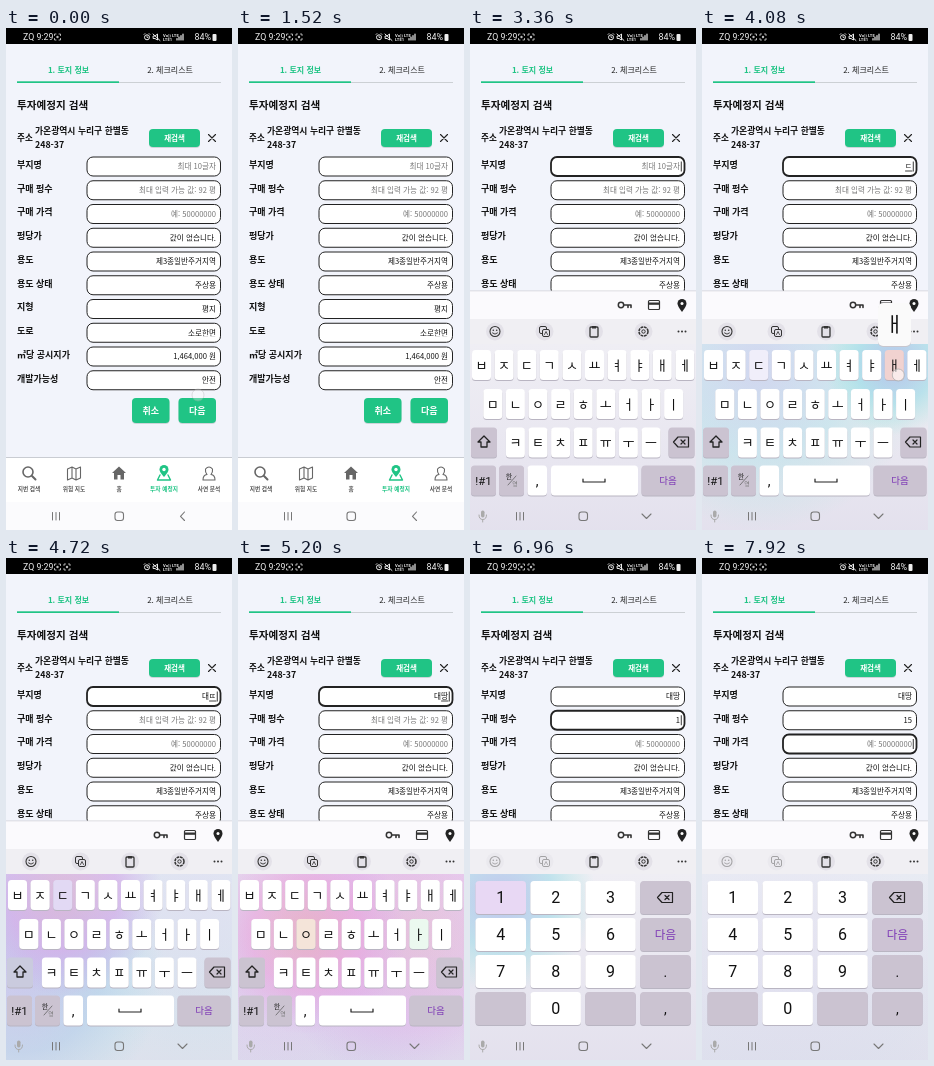
These frames come from a looping animation (226x502 px, 8000 ms). An HTML page:

```html
<!DOCTYPE html>
<html lang="ko">
<head>
<meta charset="utf-8">
<style>
html, body { margin: 0; height: 100%; overflow: hidden; background: #f2f4fb; }
svg { display: block; width: 100%; height: 100%; font-family: "Noto Sans CJK KR", "Noto Sans CJK", sans-serif; }
.latin { font-family: Roboto, "Noto Sans CJK KR", sans-serif; }
.line { fill: none; stroke: currentColor; stroke-linecap: round; stroke-linejoin: round; }
</style>
</head>
<body>
<svg id="stage" viewBox="0 0 226 502"></svg>
<script>
const LOOP = 8000, HOLD = 160;
const GREEN = '#20c485', FN = '#cbc3d1', PURPLE = '#7b35b5';
const clamp = v => Math.max(0, Math.min(1, v));

// --- markup helpers
const box = (x, y, w, h, fill, more = '') =>
  `<rect x="${x}" y="${y}" width="${w}" height="${h}" fill="${fill}" ${more}/>`;
const text = (x, y, size, s, fill = '#111', anchor = 'start', more = '') =>
  `<text x="${x}" y="${y}" font-size="${size}" fill="${fill}" text-anchor="${anchor}" ${more}>${s}</text>`;
const bold = 'font-weight="700"';
const line = (d, color = '#222', width = 1, more = '') =>
  `<path class="line" d="${d}" style="color:${color}" stroke-width="${width}" ${more}/>`;
const dot = (x, y, r, fill, more = '') => `<circle cx="${x}" cy="${y}" r="${r}" fill="${fill}" ${more}/>`;
const group = (id, body, more = '') => `<g id="${id}" ${more}>${body}</g>`;
const at = (x, y, body) => `<g transform="translate(${x} ${y})">${body}</g>`;

// --- status bar
const scan = line('M-3-1.5V-3H-1.5M1.5-3H3V-1.5M3 1.5V3H1.5M-1.5 3H-3V1.5', '#ddd', .8) + dot(0, 0, 1.2, '#bbb');
const status = box(0, 0, 226, 16, '#000') +
  text(17, 12.3, 8.8, 'ZQ 9:29', '#eee', 'start', 'class="latin"') +
  at(51.5, 9, scan) + group('scan2', at(61, 9, scan)) +
  dot(141, 9.3, 2.5, 'none', 'stroke="#eee"') + line('M138 6.5L139 5.5M144 6.5L143 5.5M141 8V9.5H142', '#eee', .8) +
  line('M147.5 8H149L151.500 6V12L149 10.500H147.500ZM147 6L154 12.500', '#eee', 1) +
  text(157, 8.7, 4.2, 'Vo)) LTE', '#eee', 'start', 'class="latin" font-weight="700"') +
  text(157, 12.8, 4.2, 'LTE1', '#eee', 'start', 'class="latin" font-weight="700"') +
  line('M171 12V10.500M173 12V9M175 12V7.500M177 12V6', '#eee', 1.2) +
  text(188.500, 12.3, 9, '84%', '#eee', 'start', 'class="latin"') +
  box(206.500, 6, 4, 7, '#eee', 'rx="1"');

// --- form
const rows = [
  ['부지명', '최대 10글자', 1], ['구매 평수', '최대 입력 가능 값: 92 평', 1], ['구매 가격', '예: 50000000', 1],
  ['평당가', '값이 없습니다.'], ['용도', '제3종일반주거지역'], ['용도 상태', '주상용'], ['지형', '평지'],
  ['도로', '소로한면'], ['㎡당 공시지가', '1,464,000 원'], ['개발가능성', '안전']
];
const rowY = i => 138.5 + i * 23.75;
const row = ([label, value, empty], i) => {
  const y = rowY(i);
  return text(11, y + 1.3, 9, label, '#111', 'start', bold) +
    box(81, y - 9.5, 133.5, 19, '#fff', `id="box${i}" rx="6" stroke="#222"`) +
    text(210, y + 2.8, 7.6, value, empty ? '#777' : '#111', 'end', `id="val${i}"`) +
    box(88, y + 3.500, 122.500, 2.500, '#fff');
};
const button = (x, y, w, h, size, s) =>
  box(x, y + 1, w, h, '#aab5b8', 'rx="4" opacity=".5"') + box(x, y, w, h, GREEN, 'rx="4"') +
  text(x + w / 2, y + h / 2 + size * .36, size, s, '#fff', 'middle', bold);

const form = box(0, 16, 226, 486, '#f2f4fb') +
  text(62.5, 44.5, 8, '1. 토지 정보', GREEN, 'middle', bold) +
  text(164, 44.5, 8, '2. 체크리스트', '#222', 'middle') +
  box(11, 54, 204, 1, '#ccd0d4') + box(11, 53.3, 102, 1.7, GREEN) +
  text(11, 80.5, 10.6, '투자예정지 검색', '#111', 'start', bold) +
  text(11, 112.8, 8.6, '주소', '#111', 'start', bold) +
  text(29, 106, 8.8, '가온광역시 누리구 한별동', '#111', 'start', bold) +
  text(29, 120, 8.8, '248-37', '#111', 'start', bold) +
  button(143, 101, 51, 18, 7.5, '재검색') + line('M202.500 106.500L209.500 113.500M209.500 106.500L202.500 113.500', '#222', 1.1) +
  rows.map(row).join('') +
  line('', '#111', .8, 'id="under"') + box(210.8, 133, .9, 10, '#222', 'id="caret"') +
  button(126, 370, 37.5, 25, 9, '취소') + button(172.5, 370, 37.5, 25, 9, '다음');

// --- bottom tabs
const person = line('M-6 7Q-6 2-2 1.500Q-4-1-3.500-4Q0-8 3.500-4Q4-1 2 1.500Q6 2 6 7Z', '#666', 1.1);
const tabIcons = [
  line('M3 3L6.500 6.500', '#666', 2) + dot(-1, -1, 5, 'none', 'stroke="#666" stroke-width="1.6"'),
  line('M-6.500-4L-2-6L2-4L6.500-6V5L2 7L-2 5L-6.500 7ZM-2-6V5M2-4V7', '#666', 1.1),
  '<path d="M-7 0L0-6.500L7 0H5V6.500H1.500V2H-1.500V6.500H-5V0Z" fill="#666"/>',
  `<path d="M0 4Q-4.500-1-4.500-3.500A4.500 4.500 0 0 1 4.500-3.500Q4.500-1 0 4Z" fill="${GREEN}"/>` +
    dot(0, -3.500, 1.7, '#fff') + line('M-4 2L-6.500 7H6.500L4 2', GREEN, 1.4),
  person
];
const tabs = box(0, 429, 226, 45, '#fff') + box(0, 429, 226, 1, '#c9ccd2') +
  ['지번 검색', '위험 지도', '홈', '투자 예정지', '사연 분석'].map((s, i) =>
    at(23 + 45 * i, 445, tabIcons[i]) + text(23 + 45 * i, 462.5, 5.7, s, i == 3 ? GREEN : '#555', 'middle', bold)).join('') +
  box(0, 474, 226, 28, '#fbfbfd');

// --- suggestion bar above the keyboard
const bar = box(0, 263, 226, 50, '#fbfafd') + box(0, 262.500, 226, .8, '#d4d3da') +
  dot(151, 277, 2.700, 'none', 'stroke="#333" stroke-width="1.5"') + line('M154 277H161M158 277V279.500M161 277V279.500', '#333', 1.6) +
  box(178.500, 272.500, 11, 9, 'none', 'rx="1" stroke="#333" stroke-width="1.200"') + box(178.500, 274.500, 11, 2.300, '#333') +
  '<path d="M212 284Q207.500 278 207.500 275.500A4.500 4.500 0 0 1 216.500 275.500Q216.500 278 212 284Z" fill="#222"/>' + dot(212, 275.500, 1.5, '#fff');

// --- keyboard
const keys = {};
const key = (id, x, y, w, h, fn, size = 0, label = id, color = '#111') => {
  keys[id] = { x: x + w / 2, y: y + h / 2, base: fn ? FN : '#fff' };
  return box(x, y + 1, w, h, '#b9b5c2', 'rx="3.500"') +
    box(x, y, w, h, fn ? FN : '#fff', `rx="3.500" id="key-${id}"`) +
    (size ? text(x + w / 2, y + h / 2 + size * .36, size, label, color, 'middle', `id="cap-${id}" class="latin"`) : '');
};
const erase = (x, y) => at(x, y, line('M-8 0L-3.500-5H7V5H-3.500ZM-.500-2L3.500 2M3.500-2L-.500 2', '#222', 1.2));
const plain = 'ㅂㅈㄷㄱㅅㅛㅕㅑㅐㅔ', shifted = 'ㅃㅉㄸㄲㅆㅛㅕㅑㅒㅖ';
const letters = (s, x, y) => [...s].map((c, i) => key(c, x + i * 22.6, y, 19, 30, 0, 13)).join('');

const hangul = letters(plain, 2, 322) + letters('ㅁㄴㅇㄹㅎㅗㅓㅏㅣ', 13.3, 361) +
  key('shift', 1, 399.500, 26, 30, 1) + at(14, 414, line('M0-6L6 0H3V5H-3V0H-6Z', '#222', 1.3)) +
  letters('ㅋㅌㅊㅍㅠㅜㅡ', 35.9, 399.500) + key('del', 198.500, 399.500, 26, 30, 1) + erase(211.500, 414) +
  key('sym', 1, 437.500, 25, 30, 1, 11.5, '!#1') +
  key('lang', 29, 437.500, 25, 30, 1) + text(39, 451, 7, '한', '#222', 'middle') + text(45, 458, 6, '영', '#777', 'middle') + line('M38 457L46 448', '#555', .7) +
  key('comma', 57.500, 437.500, 19.500, 30, 0, 14, ',') +
  key('space', 81, 437.500, 87, 30, 0) + line('M113 451V454H135V451', '#222', 1.2) +
  key('next', 171.500, 437.500, 53, 30, 1, 9.5, '다음', PURPLE);

const padX = c => 5.500 + c * 54.9, padY = r => 323 + r * 37;
const padKey = (id, c, r, fn, ...cap) => key(id, padX(c), padY(r), 50.500, 33, fn, ...cap);
const pad = [...'123456789'].map((d, i) => padKey(d, i % 3, i / 3 | 0, 0, 16)).join('') +
  padKey('blank1', 0, 3, 1) + padKey('0', 1, 3, 0, 16) + padKey('blank2', 2, 3, 1) +
  padKey('del2', 3, 0, 1) + erase(195.500, 339.500) + padKey('next2', 3, 1, 1, 11.5, '다음', PURPLE) +
  padKey('dot', 3, 2, 1, 14, '.') + padKey('comma2', 3, 3, 1, 14, ',');

const tools = [
  dot(0, 0, 5, 'none', 'stroke="#333" stroke-width="1.100"') + dot(-1.700, -1.200, .8, '#333') + dot(1.700, -1.200, .8, '#333') + line('M-2.500 1.500Q0 4 2.500 1.500', '#333', .9),
  box(-5, -5, 7, 7, 'none', 'rx="1.500" stroke="#333"') + box(-2, -2, 7, 7, '#e3e1e8', 'rx="1.500" stroke="#333"') + line('M0 3L1.500 0L3 3', '#333', .8),
  box(-4, -4.500, 8, 10, 'none', 'rx="1" stroke="#333" stroke-width="1.300"') + box(-2, -5.500, 4, 2.500, '#333'),
  dot(0, 0, 4.500, 'none', 'stroke="#333" stroke-width="1.500" stroke-dasharray="2.800 .73"') + dot(0, 0, 1.700, 'none', 'stroke="#333"')
];
const toolbar = box(0, 291, 226, 25, '#f0eff3') +
  tools.map((s, i) => group('tool' + i, dot(0, 0, 9, '#e3e1e8') + s, `transform="translate(${25 + i * 49.500} 303.500)"`)).join('') +
  [208.500, 212, 215.500].map(x => dot(x, 303.500, 1, '#333')).join('');

// Each press: time, key, glow hue, key hue, field, resulting text
const presses = [
  [3600, 'ㄷ', 187, 250, 0, 'ㄷ'], [3980, 'ㅐ', 190, 5, 0, '대'], [4320, 'shift', 210, 220],
  [4500, 'ㄷ', 285, 260, 0, '대ㄸ'], [4760, 'ㅏ', 295, 140, 0, '대따'], [4980, 'ㅇ', 310, 25, 0, '대땅'],
  [5360, 'next', 270, 280], [6760, '1', 192, 275, 1, '1'], [7040, '5', 200, 280, 1, '15'], [7280, 'next2', 280, 280]
];
const glowLife = id => id.startsWith('next') ? 600 : 1000;
const gradients = presses.map(([, , hue], i) => `<radialGradient id="hue${i}">` +
  [[0, 40, .75], [.55, 0, .8], [1, -20, 0]].map(([o, shift, a]) =>
    `<stop offset="${o}" stop-color="hsl(${hue + shift} 60% 78%)" stop-opacity="${a}"/>`).join('') + '</radialGradient>').join('');

const keyboard = box(0, 316, 226, 230, 'url(#base)') +
  `<g clip-path="url(#area)">${presses.map((p, i) => dot(0, 0, 0, `url(#hue${i})`, `id="glow${i}"`)).join('')}</g>` +
  toolbar + group('hangul', hangul) + group('pad', pad);

const system = line('M46.500 484.500V492M50 484.500V492M53.500 484.500V492', '#777', 1) +
  box(109, 484, 8.500, 8.500, 'none', 'rx="2.500" stroke="#777" stroke-width="1.100"') +
  line('M178.500 484L174.500 488.300L178.500 492.500', '#777', 1.1, 'id="back"') +
  group('hide', line('M172 486L176.500 490.500L181 486', '#777', 1.1) +
    box(11, 482.500, 3.500, 7, '#aaa', 'rx="1.700"') + line('M9 487Q9 491.500 12.700 491.500Q16.500 491.500 16.500 487M12.700 491.500V494', '#aaa', 1));

const stage = document.getElementById('stage');
stage.innerHTML = `<defs>${gradients}
  <linearGradient id="base" x2="0" y2="1"><stop stop-color="#efeef4"/><stop offset="1" stop-color="#e1deec"/></linearGradient>
  <clipPath id="area"><rect y="316" width="226" height="186"/></clipPath></defs>` +
  form + tabs + group('bar', bar) + group('keyboard', keyboard) + system +
  group('preview', box(176, 276, 33, 43, '#c8c6ce', 'rx="5"') + box(176, 275, 33, 43, '#fafafa', 'rx="5"') +
    text(192.500, 304, 20, '', '#111', 'middle', 'id="big"')) +
  dot(0, 0, 6, '#fff', 'id="touch" fill-opacity=".55" stroke="#aaa" stroke-width=".700"') + status;

// --- animation
const el = id => document.getElementById(id);
const set = (id, attrs) => { for (const k in attrs) el(id).setAttribute(k, attrs[k]); };
const show = (id, on) => set(id, { visibility: on ? 'visible' : 'hidden' });
const write = (id, s) => { if (el(id).textContent != s) el(id).textContent = s; };

function draw(t) {
  const focus = t < 2080 ? -1 : t < 5520 ? 0 : t < 7440 ? 1 : 2;
  const numeric = t >= 5680, up = t >= 2080;
  const caps = t >= 4400 && t < 4660;

  show('scan2', t >= 400);
  const values = rows.slice(0, 3).map(() => '');
  for (const [time, , , , field, s] of presses) if (s && t >= time + HOLD) values[field] = s;
  values.forEach((s, i) => {
    write('val' + i, s || rows[i][1]);
    set('val' + i, { fill: s ? '#111' : '#777' });
    set('box' + i, { 'stroke-width': i == focus ? 1.8 : 1 });
  });
  show('caret', focus >= 0);
  set('caret', { y: rowY(Math.max(0, focus)) - 5 });
  set('under', { d: focus == 0 && values[0] ? 'M203.500 143H210' : '' });

  show('bar', up);
  set('bar', { opacity: clamp((t - 2160) / 220) });
  show('keyboard', up);
  const slide = 211 * (1 - clamp((t - 2080) / 400)) ** 3;
  set('keyboard', { transform: `translate(0 ${slide})` });
  show('back', !up);
  show('hide', up);
  set('hangul', { display: numeric ? 'none' : 'inline' });
  set('pad', { display: numeric ? 'inline' : 'none' });
  for (const i of [0, 1]) set('tool' + i, { opacity: numeric ? .4 : 1 });
  [...plain].forEach((c, i) => write('cap-' + c, caps ? shifted[i] : c));

  const tints = {};
  let held = null;
  presses.forEach(([time, id, , hue], i) => {
    const age = t - time, p = age / glowLife(id), k = keys[id];
    const lit = p >= 0 && p < 1;
    set('glow' + i, { cx: k.x, cy: k.y, r: lit ? 45 + 250 * p : 0, opacity: lit ? 1 - p : 0 });
    tints[id] ??= k.base;
    if (age >= 0 && age < 700)
      tints[id] = `color-mix(in srgb, hsl(${hue} 55% 86%) ${100 * (1 - age / 700)}%, ${k.base})`;
    if (age >= 0 && age < HOLD) held = id;
  });
  for (const id in tints) set('key-' + id, { fill: tints[id] });

  const popup = held && held.length == 1 && !numeric;
  show('preview', popup);
  if (popup) {
    write('big', caps && held == 'ㄷ' ? 'ㄸ' : held);
    const k = keys[held];
    set('preview', { transform: `translate(${k.x - 192.3} ${k.y - 337})` });
  }
  const spot = held ? [keys[held].x + 4, keys[held].y + 10] : t < 240 ? [192, 367] : [150, 139];
  const strength = held ? 1 : t < 240 ? .5 * (1 - t / 240) : t >= 2000 && t < 2120 ? .8 : 0;
  set('touch', { cx: spot[0], cy: spot[1], opacity: strength });
}

const start = performance.now();
function tick() {
  draw((performance.now() - start) % LOOP);
  requestAnimationFrame(tick);
}
tick();
</script>
</body>
</html>
```
